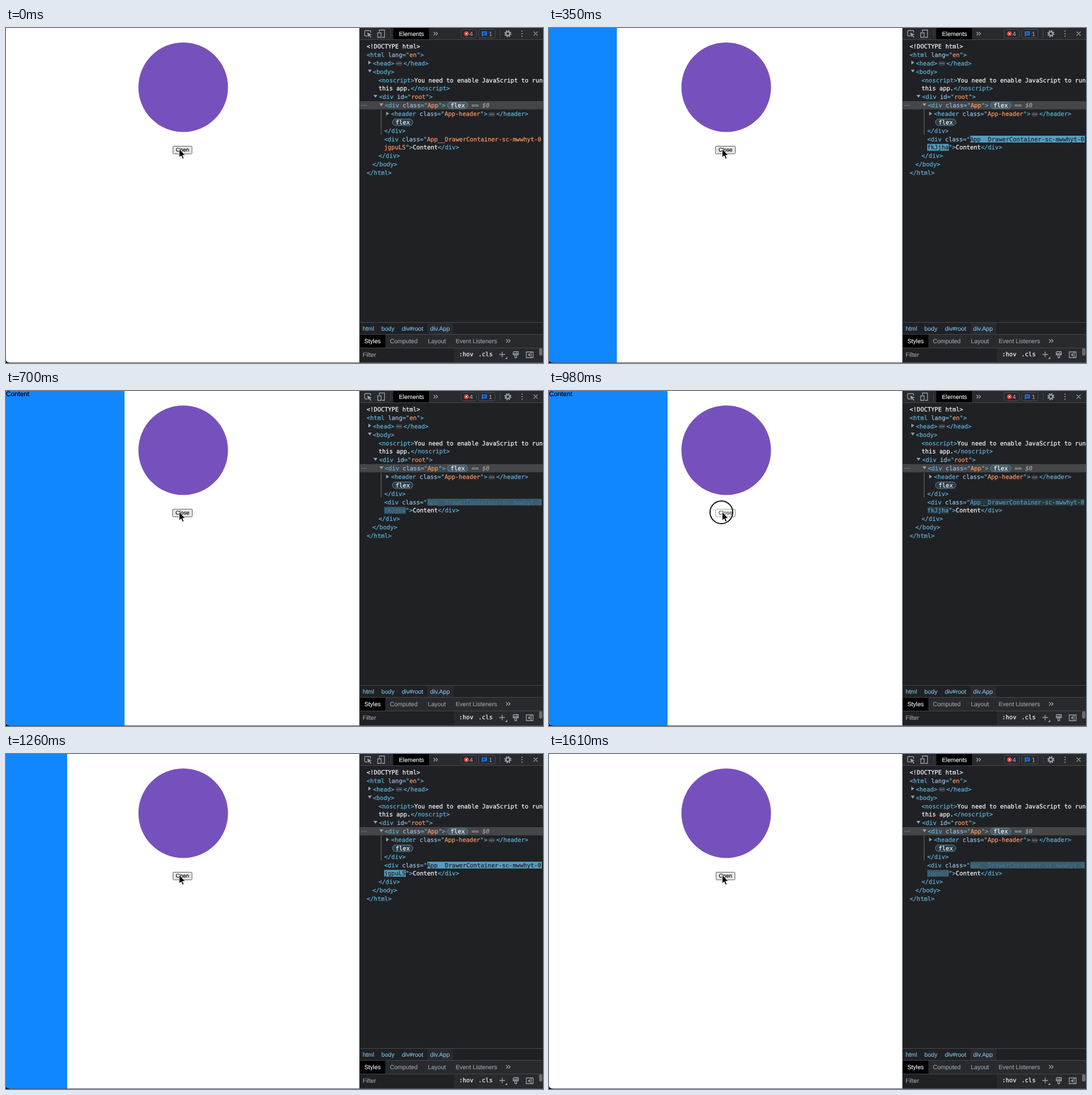
An HTML page for the animation above (1.68 s loop, 947x591 px).

```html
<!DOCTYPE html>
<html lang="en">
<head>
<meta charset="utf-8">
<style>
  html, body { margin: 0; width: 100%; height: 100%; overflow: hidden; background: #000; }
  svg { display: block; width: 947px; height: 591px; }
  text {
    font: 10.6px "Liberation Sans", Arial, sans-serif;
    white-space: pre; text-rendering: geometricPrecision;
    fill: currentColor; stroke: currentColor; stroke-width: .15;
  }
  .mono { font: 10.46px "DejaVu Sans Mono", Menlo, monospace; stroke-width: .25; }
  .tag { color: #5db0d7; }
  .attr { color: #9bbbdc; }
  .value { color: #f29766; }
  .plain { color: #f1f3f4; }
  .dim { color: #9aa0a6; }
  .crumb { color: #79bfe8; }
  .slant { font-style: italic; }
  .icon { fill: none; stroke: #9aa0a6; stroke-width: 1.3; }
  .badge { fill: #5db0d7; fill-opacity: .2; stroke: #5b8598; }
  .count { fill: none; stroke: #4a4c50; }
  .label { font-size: 9.6px; text-anchor: middle; }
</style>
</head>
<body>
<svg viewBox="0 0 947 591">
  <!-- page -->
  <path d="M0 0H623V590H6Q0 590 0 584Z" fill="#fff"/>
  <path d="M6 590.5H947" stroke="#57585a"/>
  <clipPath id="page"><path d="M0 0H623V590H6Q0 590 0 584Z"/></clipPath>
  <circle cx="312.5" cy="104.5" r="79" fill="#7651bd"/>
  <g clip-path="url(#page)">
    <g id="drawer">
      <rect width="209" height="590" fill="#1187ff"/>
      <text y="9.3" style="font-size:11.7px">Content</text>
    </g>
  </g>
  <rect id="button" y="208.5" height="13.5" rx="1.5"/>
  <text id="label" class="label" x="311.2" y="218.4"></text>
  <circle id="ring" cx="304" cy="214" r="20" fill="#fff" fill-opacity=".25" stroke="#111" stroke-width="2"/>
  <path d="M305.5 213.500V228.500L308.900 225.300 311.300 230.700 313.700 229.700 311.400 224.400H316Z" fill="#000" stroke="#fff" stroke-width=".8"/>

  <!-- inspector panels -->
  <rect x="623" width="324" height="590" fill="#202124"/>
  <rect x="624" width="323" height="20" fill="#292a2d"/>
  <rect x="683" width="63" height="20" fill="#000"/>
  <rect x="624" y="129" width="323" height="14.5" fill="#454648"/>
  <rect x="743" y="520" width="46" height="20" fill="#292a2d"/>
  <rect x="624" y="541" width="323" height="49" fill="#292a2d"/>
  <rect x="624" y="541" width="45" height="23" fill="#000"/>
  <rect x="624" y="565" width="166" height="24" fill="#202124"/>
  <path d="M623.5 0V590M624 20.5H947M624 519.5H947M624 540.5H947M624 564.5H947M678.5 3V17M871.5 3V17" stroke="#46484c" fill="none"/>
  <path d="M661.5 144V188" stroke="#63717b"/>

  <!-- toolbar -->
  <g class="icon">
    <path d="M637 14H634Q632.5 14 632.5 12.5V6Q632.5 4.5 634 4.5H641.5Q643 4.5 643 6V8"/>
    <path d="M637 8L645 11.5 641.5 12.5 644.5 16 643 17 640 13.5 638.5 16Z" fill="#9aa0a6" stroke="none"/>
    <path d="M658.5 7V3.5H667.5V16.5H663M655.5 8.5H661.5V16.5H655.5Z"/>
    <path d="M754 7L757 10 754 13M758 7L761 10 758 13M930.5 6.5L937.5 13.5M937.5 6.5L930.5 13.5"/>
    <path d="M882 549L885 552 882 555M886 549L889 552 886 555"/>
    <circle cx="885" cy="10" r="3.4" stroke-width="2.4"/>
    <circle cx="885" cy="10" r="5.3" stroke-width="2" stroke-dasharray="2.2 1.963"/>
    <path d="M910 5.5h.01M910 10h.01M910 14.5h.01" stroke-width="2.2" stroke-linecap="round"/>
    <path d="M870 576H880M875 571V581"/>
    <path d="M884 580V584H880Z" fill="#9aa0a6" stroke="none"/>
    <path d="M895 571H903.5V576.5H894.5V571M894.5 574.5H903.5M897.5 577V581.5H900.5V577M900.5 571V573"/>
    <path d="M917.5 571.5H929.5V581.5H917.5ZM926 571.5V581.5"/>
    <path d="M924 573.5V579.5L920 576.5Z" fill="#9aa0a6" stroke="none"/>
  </g>
  <rect class="count" x="802.5" y="2.5" width="27" height="15" rx="3"/>
  <rect class="count" x="833.5" y="2.5" width="29" height="15" rx="3"/>
  <circle cx="812" cy="10" r="4.3" fill="#e8453c"/>
  <path d="M810.5 8.5L813.5 11.5M813.5 8.5L810.5 11.5" stroke="#fff"/>
  <path d="M839 6H848V13H842L839 15Z" fill="#1a73e8"/>
  <path d="M841 8.5H846M841 10.5H845" stroke="#202124"/>
  <rect x="940" y="565" width="6" height="13" rx="3" fill="#6b6c6e"/>

  <rect class="tint" x="743" y="190" width="202" height="12"/>
  <rect class="tint" x="667" y="204.5" width="38" height="12"/>
  <g id="tree"></g>
</svg>
<script>
const $ = id => document.getElementById(id);
const kinds = { T: 'tag', A: 'attr', V: 'value', P: 'plain', D: 'dim', I: 'dim slant', H: 'value hash' };
const esc = s => s.replace(/</g, '&lt;');
const parts = [];

// Segments are split by "|"; the first letter of each selects its colour.
function row(x, y, src) {
  const spans = src.split('|').map(s => `<tspan class="${kinds[s[0]]}">${esc(s.slice(1))}</tspan>`);
  parts.push(`<text class="mono" x="${x}" y="${y + 3.7}">${spans.join('')}</text>`);
}
function ui(x, y, str, cls = 'dim') {
  parts.push(`<text class="${cls}" x="${x}" y="${y + 3.7}">${str}</text>`);
}
function arrow(x, y, open) {
  const d = open ? 'h7l-3.5 5z' : 'v7l5-3.5z';
  parts.push(`<path fill="#9aa0a6" d="M${x} ${y - (open ? 2.5 : 3.5)}${d}"/>`);
}
function dots(x, y) {
  parts.push(`<rect x="${x}" y="${y - 3.5}" width="12" height="8" rx="4" fill="#3b3d41"/>
    <path d="M${x + 3} ${y + .5}h.01m3 0h.01m3 0h.01" stroke="#aeb4b9" stroke-width="1.6" stroke-linecap="round"/>`);
}
function flex(x, y) {
  parts.push(`<rect class="badge" x="${x + .5}" y="${y - 5.5}" width="36" height="11.5" rx="5.7"/>`);
  row(x + 6, y, 'Pflex');
}

row(636, 32, 'P<!DOCTYPE html>');
row(636, 47, 'T<html |Alang|T="|Ven|T">');
arrow(639, 61, false);
row(647, 62, 'T<head>');
dots(687, 62);
row(701, 62, 'T</head>');
arrow(638, 76, true);
row(647, 77, 'T<body>');
row(657, 92, 'T<noscript>|PYou need to enable JavaScript to run');
row(657, 106.5, 'Pthis app.|T</noscript>');
arrow(648, 120.5, true);
row(658, 121, 'T<div |Aid|T="|Vroot|T">');
parts.push('<path d="M628 136.5h.01m3.5 0h.01m3.5 0h.01" stroke="#9aa0a6" stroke-width="1.6" stroke-linecap="round"/>');
arrow(658.5, 135.5, true);
row(668, 136.3, 'T<div |Aclass|T="|VApp|T">');
flex(778, 136.3);
row(821, 136.3, 'D== |I$0');
arrow(670.5, 151, false);
row(679, 151.7, 'T<header |Aclass|T="|VApp-header|T">');
dots(850.5, 151.7);
row(864.5, 151.7, 'T</header>');
flex(681, 166);
row(667, 181, 'T</div>');
row(667, 196, 'T<div |Aclass|T="|HApp__DrawerContainer-sc-mwwhyt-0');
row(667, 210.5, 'HjgpuLS|T">|PContent|T</div>');
row(657, 225, 'T</div>');
row(646, 240, 'T</body>');
row(636, 255.3, 'T</html>');

ui(693, 10, 'Elements', 'plain');
ui(817.5, 10, '4');
ui(851.5, 10, '1');
ui(629, 530, 'html', 'crumb');
ui(662, 530, 'body', 'crumb');
ui(698, 530, 'div#root', 'crumb');
ui(748, 530, 'div.App', 'crumb');
ui(632, 552, 'Styles', 'plain');
ui(677, 552, 'Computed');
ui(744, 552, 'Layout');
ui(793, 552, 'Event Listeners');
ui(629, 576.5, 'Filter');
ui(799, 575.5, ':hov', 'mono plain');
ui(833, 575.5, '.cls', 'mono plain');
$('tree').innerHTML = parts.join('');

const hashes = document.querySelectorAll('.hash');
const tints = document.querySelectorAll('.tint');
const LOOP = 1680, STEP = 70, WIDTH = 209, SLIDE = 368;

const bezier = (a, b, s) => 3 * a * s * (1 - s) ** 2 + 3 * b * s * s * (1 - s) + s ** 3;

// The CSS "ease" curve, solved by bisection.
function ease(x) {
  if (x <= 0) return 0;
  if (x >= 1) return 1;
  let lo = 0, hi = 1;
  for (let i = 0; i < 24; i++) {
    const mid = (lo + hi) / 2;
    if (bezier(.25, .25, mid) < x) lo = mid; else hi = mid;
  }
  return bezier(.1, 1, lo);
}

const DARK = [32, 33, 36], BLUE = [93, 176, 215];
const mix = k => `rgb(${DARK.map((d, i) => d + (BLUE[i] - d) * k)})`;

function draw(t) {
  const slid = ease((t - 228) / SLIDE) - ease((t - 1155) / SLIDE);
  $('drawer').setAttribute('transform', `translate(${(slid - 1) * WIDTH})`);

  const pressed = t >= 70 && t < 210 || t >= 980 && t < 1120;
  const open = t >= 210 && t < 1120;
  const button = $('button');
  button.setAttribute('x', open ? 293.5 : 294.5);
  button.setAttribute('width', open ? 35 : 33.5);
  button.setAttribute('fill', pressed ? '#f5f5f5' : '#e5e5e5');
  button.setAttribute('stroke', pressed ? '#8d8d8d' : '#5c5c5c');
  $('label').textContent = open ? 'Close' : 'Open';
  $('ring').style.display = pressed ? '' : 'none';

  // A class change flashes its background, which then fades.
  const flashing = t >= 350;
  const age = t - (t < 1260 ? 330 : 1240);
  const glow = Math.max(0, 1 - age / 1100) ** 2;
  hashes.forEach(h => h.style.color = flashing ? mix(1 - glow) : '');
  tints.forEach(r => r.style.fill = flashing ? mix(glow * .9) : 'none');
  hashes[1].textContent = flashing && t < 1260 ? 'fkJjha' : 'jgpuLS';
}

const start = performance.now();
function tick() {
  const t = (performance.now() - start) % LOOP;
  draw(Math.floor(t / STEP) * STEP);
  requestAnimationFrame(tick);
}
tick();
</script>
</body>
</html>
```
